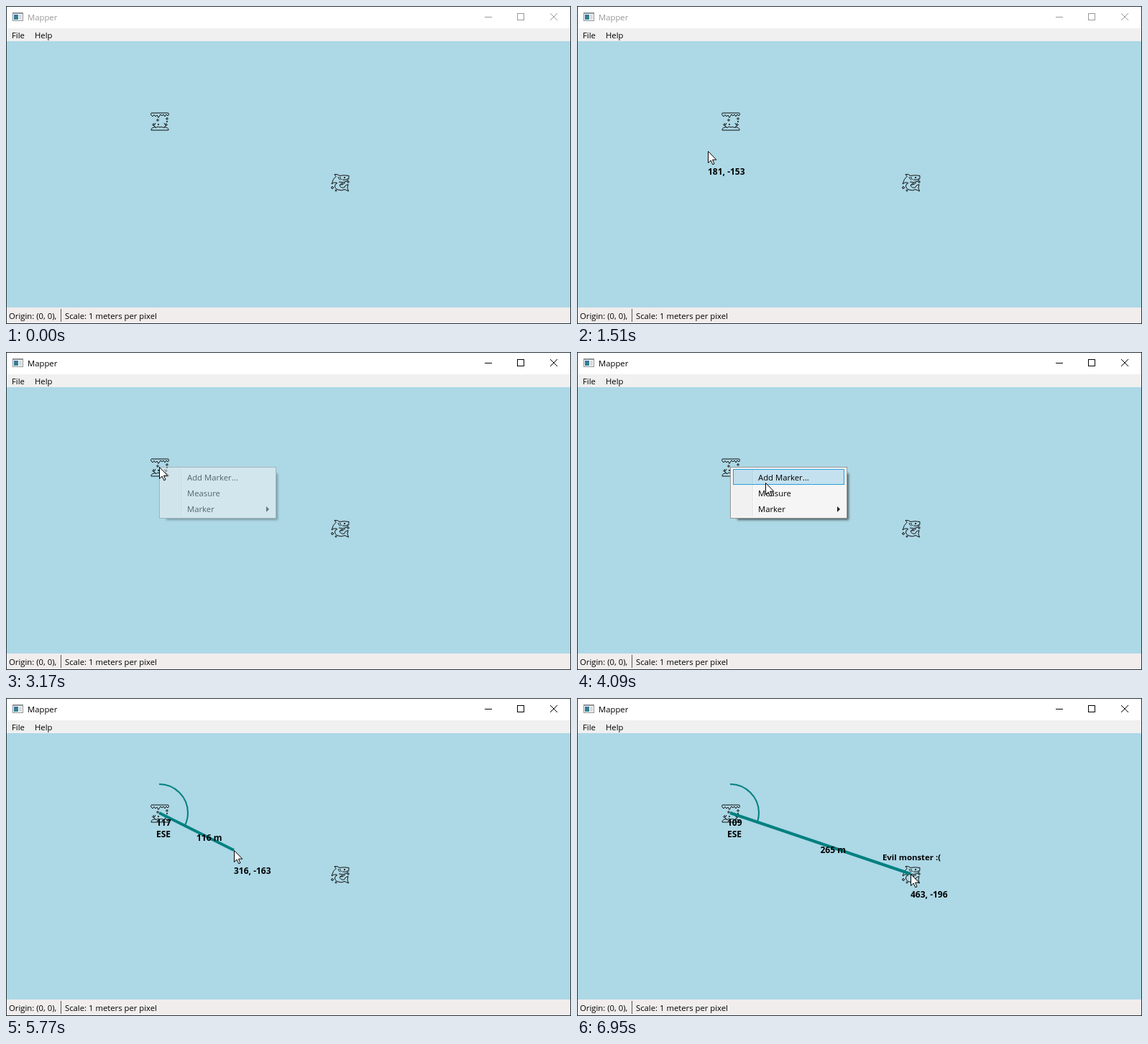
Recreate the animation shown at these times as an HTML page with a canvas. Size 786 by 443 pixels, loop 8000 ms.

```html
<!DOCTYPE html>
<html lang="en">
<head>
<meta charset="utf-8">
<title>Mapper</title>
<style>
html, body { margin: 0; width: 100%; height: 100%; overflow: hidden; }
canvas { display: block; width: 786px; height: 443px; }
</style>
</head>
<body>
<canvas id="stage" width="786" height="443"></canvas>
<script>
const LOOP = 8000, W = 786, H = 443;
const MAP_TOP = 49, MAP_BOTTOM = 420;
const ORIGIN = { x: 213, y: 160 };
const ENTER = 490, MENU_OPEN = 3040, MENU_CLOSE = 4520;
const COMPASS = 'N NNE NE ENE E ESE SE SSE S SSW SW WSW W WNW NW NNW'.split(' ');
const FACE = '"Open Sans", "Noto Sans", sans-serif';
const PLAIN = '11.3px ' + FACE;
const NAME = 'bold 11.4px ' + FACE;
const NUMBER = 'bold 12px ' + FACE;

// Pointer stops: time, x, y
const PATH = [
  [490, 478, 426], [770, 301, 334], [1000, 301, 334],
  [1510, 182, 202], [1560, 182, 202], [1790, 208, 170], [1840, 208, 170],
  [1920, 213, 161], [2630, 213, 161], [2660, 213, 160], [3500, 213, 160],
  [4090, 262, 182], [4140, 262, 182], [4240, 268, 196], [4520, 268, 196],
  [4830, 275, 201], [5029, 275, 201], [5030, 275, 200], [5060, 275, 200],
  [5390, 321, 216], [5620, 321, 216], [5770, 317, 212], [5800, 317, 212],
  [6410, 444, 243], [6460, 452, 242], [6540, 466, 241], [6690, 466, 241],
  [6820, 467, 244], [6950, 464, 245], [8000, 464, 245]
];

const MARKERS = [
  { x: 214, y: 161, name: 'Happy place :)', draw: drawCave },
  { x: 465, y: 246, name: 'Evil monster :(', draw: drawShark }
];
const ITEMS = ['Add Marker...', 'Measure', 'Marker'];

const stage = document.getElementById('stage').getContext('2d');
const menuCanvas = document.createElement('canvas');
menuCanvas.width = W;
menuCanvas.height = H;
const menuLayer = menuCanvas.getContext('2d');
let g = stage;

function rect(x, y, w, h, color) {
  g.fillStyle = color;
  g.fillRect(x, y, w, h);
}

function frame(x, y, w, h, color) {
  g.strokeStyle = color;
  g.lineWidth = 1;
  g.strokeRect(x + 0.5, y + 0.5, w - 1, h - 1);
}

function text(s, x, y, font = PLAIN, color = '#000', align = 'left') {
  g.font = font;
  g.fillStyle = color;
  g.textAlign = align;
  g.fillText(s, x, y);
}

function stroke(d, color = '#111', width = 1) {
  g.strokeStyle = color;
  g.lineWidth = width;
  g.stroke(new Path2D(d));
}

function bubble(x, y, r) {
  g.beginPath();
  g.arc(x, y, r, 0, 7);
  g.stroke();
}

function pointerAt(t) {
  let i = 1;
  while (i < PATH.length - 1 && PATH[i][0] <= t) i++;
  const [t0, x0, y0] = PATH[i - 1], [t1, x1, y1] = PATH[i];
  const k = Math.min(1, Math.max(0, (t - t0) / (t1 - t0)));
  return { x: Math.round(x0 + (x1 - x0) * k), y: Math.round(y0 + (y1 - y0) * k) };
}

function drawCave() {
  stroke('M-11 -12 H11 Q12.5 -12 12.5 -10.5 Q12 -8 11 -8 L9 -10 L7 -7 L5 -10 L3 -8 ' +
    'L1 -10 L-2 -5.5 L-4 -9 L-6 -7 L-8 -9.5 L-10 -7 Q-12.5 -9 -12.5 -10.5 Q-12.5 -12 -11 -12 Z');
  stroke('M-12 12 H12 Q12.5 10 10.5 9 Q8 6.5 5 8.5 Q3 6.5 0 8 Q-3 6 -5 8.5 Q-8 6.5 -10.5 9 Q-12.5 10 -12 12 Z');
  stroke('M-6 8 Q-9 6 -9 2 M-8 6 L-11 4 M-7.5 5 L-6 2 M6 8 Q9 6 9 2 M8 6 L11 4 M7.5 5 L6 2');
  bubble(-3, -2, 1.2);
  bubble(-2, 4, 0.7);
  bubble(10, -4, 1.2);
  bubble(10, 0, 0.7);
}

function drawShark() {
  stroke('M-12 2 Q-10 -6 -6 -8.5 L-8 -11.5 Q-3 -12 -1 -9.5 Q5 -11 12 -9.5 Q13 -5 9 -2 Q4 1 -2 -1');
  stroke('M-12 2 Q-9 -1 -5 0 Q-3 1 -7 2.5 Q-9 8 -3 10 Q2 12 6 9.5 L11.5 12 Q8.5 7 11 2.5 Q6.5 3 5.5 7 Q1 8 -1 4 Q0 1 4 1');
  stroke('M-3 -8 Q-2 -5 0 -3.5 M-0.5 -8 Q0 -5.5 2 -4 M3 -4 Q8 -3 11 -5.5 M0 3 Q3 4 7 0');
  rect(5, -8, 2, 2, '#111');
  bubble(-11, 7, 1.4);
  bubble(-6, 11, 1);
  bubble(11, -1, 1.2);
}

function drawMarker(m) {
  g.save();
  g.translate(m.x, m.y);
  g.lineJoin = 'round';
  m.draw();
  g.restore();
}

function drawWindow(active) {
  const ink = active ? '#000' : '#999';
  rect(0, 0, W, 31, '#fff');
  rect(0, 31, W, 18, '#f0f0f0');
  rect(0, MAP_BOTTOM, W, H - MAP_BOTTOM, '#f1eded');

  rect(9, 9, 15, 12, '#8a9296');
  rect(10, 11, 13, 9, '#fff');
  const blue = g.createLinearGradient(11, 12, 16, 19);
  blue.addColorStop(0, '#3b6ea5');
  blue.addColorStop(1, '#2f8a86');
  rect(11, 12, 6, 7, blue);
  rect(18, 12, 4, 7, '#d5d9dc');
  text('Mapper', 30, 20, PLAIN, ink);

  rect(666, 15, 10, 1, ink);
  frame(711, 10, 10, 10, ink);
  stroke('M757 10 L767 20 M767 10 L757 20', ink);

  text('File', 8, 45);
  text('Help', 40, 45);
  text('Origin: (0, 0),', 4, 436);
  rect(76, 422, 1, 18, '#555');
  text('Scale: 1 meters per pixel', 82, 436);
}

function drawMeasure(p) {
  const dx = p.x - ORIGIN.x, dy = p.y - ORIGIN.y;
  const angle = Math.atan2(dy, dx);
  const bearing = (angle * 180 / Math.PI + 450) % 360;
  g.strokeStyle = '#008080';
  g.lineWidth = 2;
  g.beginPath();
  g.arc(ORIGIN.x, ORIGIN.y, 40, -Math.PI / 2, angle);
  g.stroke();
  g.lineWidth = 4;
  g.beginPath();
  g.moveTo(ORIGIN.x, ORIGIN.y);
  g.lineTo(p.x, p.y);
  g.stroke();
  text(Math.round(bearing), 209, 178, NUMBER);
  text(COMPASS[Math.round(bearing / 22.5) % 16], 209, 194, NUMBER);
  text(Math.round(Math.hypot(dx, dy)) + ' m', ORIGIN.x + dx / 2, ORIGIN.y + dy / 2 + 13, NUMBER);
}

function drawMenu(p) {
  const { x, y } = ORIGIN;
  g.clearRect(0, 0, W, H);
  g.save();
  g.shadowColor = 'rgba(0,0,0,.55)';
  g.shadowBlur = 3;
  g.shadowOffsetX = g.shadowOffsetY = 2;
  rect(x + 8, y + 7, 155, 65, '#777');
  g.restore();
  rect(x, y, 163, 72, '#f5f5f5');
  frame(x, y, 163, 72, '#979797');
  rect(x + 3, y + 3, 28, 66, '#f1f1f1');
  rect(x + 31, y + 3, 1, 66, '#e2e3e3');
  rect(x + 32, y + 3, 1, 66, '#fff');
  ITEMS.forEach((label, i) => {
    const top = y + 3 + i * 22;
    if (p.x >= x + 4 && p.y >= top && p.y < top + 22) {
      rect(x + 4, top, 155, 22, 'rgba(38,160,218,.24)');
      frame(x + 4, top, 155, 22, '#26a0da');
    }
    text(label, x + 39, top + 16);
  });
  g.fillStyle = '#222';
  g.fill(new Path2D('M362 215 L366 219 L362 223 Z'));
}

function drawPointer(p) {
  g.save();
  g.translate(p.x + 0.5, p.y + 0.5);
  const arrow = new Path2D('M0 0 V16 L3.7 12.6 L6.3 18.3 L8.5 17.3 L6 11.7 H11.3 Z');
  g.fillStyle = '#fff';
  g.fill(arrow);
  g.strokeStyle = '#000';
  g.lineWidth = 1;
  g.stroke(arrow);
  g.restore();
}

function draw(t) {
  const p = pointerAt(t);
  const shown = t >= ENTER;
  const menu = t >= MENU_OPEN && t < MENU_CLOSE;

  rect(0, 0, W, H, '#add8e6');
  MARKERS.forEach(drawMarker);
  if (t >= MENU_CLOSE) drawMeasure(p);
  if (shown && !menu) {
    for (const m of MARKERS) {
      if (Math.abs(p.x - m.x) <= 13 && Math.abs(p.y - m.y) <= 13)
        text(m.name, m.x + 0.5, m.y - 20, NAME, '#000', 'center');
    }
    text(`${p.x - 1}, ${MAP_TOP - p.y}`, p.x, p.y + 33, NUMBER);
  }
  drawWindow(t >= MENU_OPEN);

  if (menu) {
    g = menuLayer;
    drawMenu(p);
    g = stage;
    // The fade advances in 50 ms steps
    const step = Math.floor((t - 3020) / 50) * 50 + 3020;
    g.globalAlpha = Math.min(1, Math.max(0, (step - 3060) / 210));
    g.drawImage(menuCanvas, 0, 0);
    g.globalAlpha = 1;
  }
  frame(0, 0, W, H, '#263238');
  if (shown) drawPointer(p);
}

const start = performance.now();
function tick() {
  draw((performance.now() - start) % LOOP);
  requestAnimationFrame(tick);
}
tick();
</script>
</body>
</html>
```
